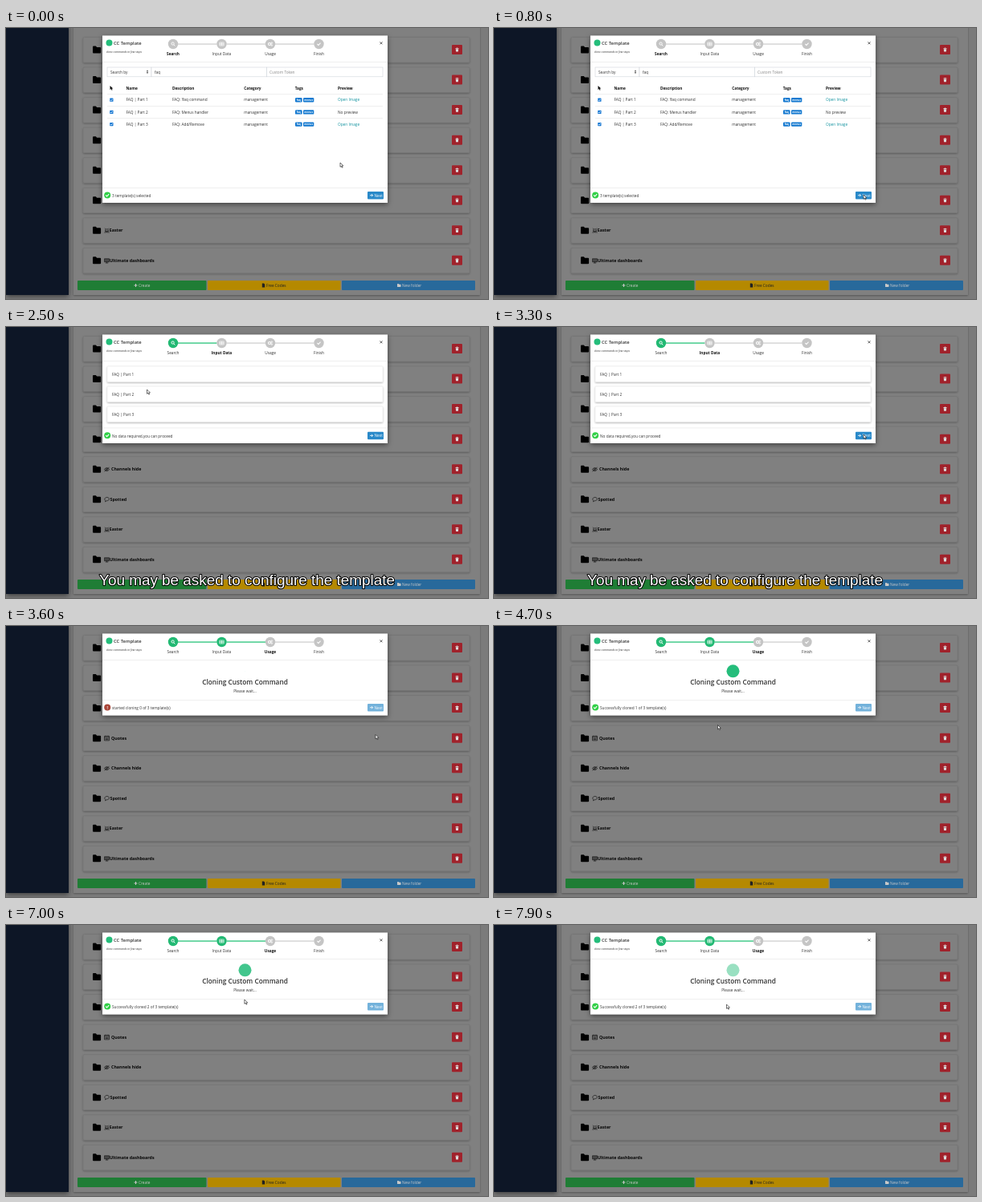
Animation of 600x338 px, one loop 8 s. Source, as an HTML page:

```html
<!DOCTYPE html>
<html lang="en">
<head>
<meta charset="utf-8">
<style>
  html, body { margin: 0; width: 100%; height: 100%; overflow: hidden; background: #808080; }
  svg { display: block; width: 600px; height: 338px; }
  text { font-family: "Open Sans", "Noto Sans", sans-serif; font-size: 4.75px; fill: #333; }
  .b { font-weight: 700; fill: #111; }
  .mid { text-anchor: middle; }
  #caption { font: 18.9px "Liberation Sans", Arial, sans-serif; fill: #fff; stroke: #000;
    stroke-width: 2px; paint-order: stroke; stroke-linejoin: round; }
</style>
</head>
<body>
<svg id="stage" viewBox="0 0 600 338">
  <defs>
    <linearGradient id="navy" x2="0" y2="1">
      <stop stop-color="#0b1525"/><stop offset="1" stop-color="#081326"/>
    </linearGradient>
    <filter id="soft" x="-10%" y="-30%" width="120%" height="180%">
      <feDropShadow dx="0" dy="1" stdDeviation="1" flood-opacity=".3"/>
    </filter>
    <filter id="deep" x="-10%" y="-20%" width="120%" height="150%">
      <feDropShadow dx="0" dy="2" stdDeviation="3" flood-opacity=".5"/>
    </filter>
    <path id="folder" d="M0 1q0-1 1-1h2.8l1.3 1.5h4q1 0 1 1v5.5q0 1-1 1H1q-1 0-1-1z"/>
    <path id="trash" d="M-2-2h1.2l.4-.6h.8l.4.6H2v.8h-4zM-1.7-.8h3.4L1.4 2.6h-2.8z" fill="#ddd"/>
    <path id="check" d="M-2 0L-.6 1.5 2-1.4" fill="none" stroke="#fff" stroke-width="1.1"/>
    <path id="arrow" d="M0 0v5.3l1.3-1.1.9 2 .9-.4-.9-1.9h1.7z" fill="#fff" stroke="#111" stroke-width=".6"/>
  </defs>
  <g id="page"></g>
  <g id="dialog"></g>
  <text id="caption" class="mid" x="300" y="322">You may be asked to configure the template</text>
  <use id="cursor" href="#arrow"/>
</svg>
<script>
const $ = id => document.getElementById(id);
const rect = (x, y, w, h, fill, more = '') =>
  `<rect x="${x}" y="${y}" width="${w}" height="${h}" fill="${fill}" ${more}/>`;
const text = (x, y, s, more = '') => `<text x="${x}" y="${y}" ${more}>${s}</text>`;
const circle = (x, y, r, fill, more = '') => `<circle cx="${x}" cy="${y}" r="${r}" fill="${fill}" ${more}/>`;
const path = (d, x, y, more = 'fill="#fff"') => `<path d="${d}" transform="translate(${x} ${y})" ${more}/>`;
const use = (id, x, y, more = '') => `<use href="#${id}" x="${x}" y="${y}" ${more}/>`;
const hline = (y, x = 120, w = 355) => rect(x, y, w, .5, '#dedede');

const line = 'fill="none" stroke="#151515" stroke-width=".7"';
const icons = {
  note: 'M-3-2.7h6v5.5h-6zM-3-1.2h6M-2 .2h4M-2 1.5h4M-1.5-3.3v1M1.5-3.3v1',
  eye: 'M-3.2 0Q0-4 3.2 0Q0 4-3.2 0M-1.2 0a1.2 1.2 0 1 0 2.4 0a1.2 1.2 0 1 0-2.4 0M-3 2.5L3-2.5',
  bubble: 'M-2 2.7l.3-1.3C-4-.7-2-2.7.3-2.7C4-2.7 3.6 1.8-.2 1.6z',
  bear: 'M-2.4-3l1.3 1.3h2.2L2.4-3M-1.8-1.5v2h3.6v-2M-1.8.5L-2.7 3M1.8.5L2.7 3M-1.5 2.6L1.5.7M-1.5.7l3 1.9',
  screen: 'M-3-2.5h6v4h-6zM0 1.5v1.2M-1.7 2.8h3.4M-2.5-1.5h5M-2.5-.3h5M-2.5.8h5'
};

function drawPage() {
  const rows = [, , , ['note', 'Quotes', 131], ['eye', 'Channels hide', 131],
    ['bubble', 'Spotted', 129.5], ['bear', 'Easter', 128.8], ['screen', 'Ultimate dashboards', 129]];
  let s = rect(0, 0, 600, 338, '#7b7b7b') + rect(84, -5, 506, 338, '#808080', 'filter="url(#soft)"')
    + rect(0, -5, 78, 338, 'url(#navy)', 'filter="url(#deep)"');
  for (let i = 0; i < 8; i++) {
    const y = 27 + i * 37.55;
    s += rect(96, y - 15.5, 481, 31.5, '#808080', 'rx="1.5" stroke="#707070" stroke-width=".5" filter="url(#soft)"')
      + use('folder', 108, y - 4.5) + rect(555, y - 6, 13, 12, '#a0222b', 'rx="1"') + use('trash', 561.5, y);
    if (rows[i]) {
      const [icon, name, x] = rows[i];
      s += path(icons[icon], 125.5, y + .4, line) + text(x, y + 2, name, 'class="b" style="font-size:5.3px;fill:#050505"');
    }
  }
  const dim = 'style="fill:#c8c8c8"';
  return s + rect(89, 315, 160.5, 12, '#1f7d35', 'rx="1"') + rect(251, 315, 165.5, 12, '#b58900', 'rx="1"')
    + rect(418, 315, 166, 12, '#28699b', 'rx="1"')
    + path('M-2 0h4M0-2v4', 161.5, 321, 'stroke="#c8c8c8" stroke-width="1"') + text(165, 322.7, 'Create', dim)
    + path('M-1.7-2.5h2.2l1.2 1.2v3.8h-3.4z', 320.5, 321, 'fill="#222"') + text(324, 322.7, 'Free Codes', 'style="fill:#222"')
    + use('folder', 487, 319, 'transform="translate(487 319) scale(.45) translate(-487 -319)" fill="#c8c8c8"')
    + text(493, 322.7, 'New folder', dim);
}

const stepX = [208, 268.5, 329, 389.5];
function stepIcon(i, x) {
  if (i == 0) return path('M-2-.5a1.6 1.6 0 1 0 3.2 0a1.6 1.6 0 1 0-3.2 0M.8.8L2.4 2.4', x, 20, 'fill="none" stroke="#fff"');
  if (i == 1) return path('M-2.7-2h5.4v4h-5.4zM-2.7-.6h5.4M-2.7.7h5.4M0-2v4', x, 20, 'fill="none" stroke="#fff" stroke-width=".6"');
  if (i == 2) return circle(x - 1, 20, 1.5, 'none', 'stroke="#fff" stroke-width="1.1"')
    + circle(x + 1.8, 18.6, .8, 'none', 'stroke="#fff" stroke-width=".8"')
    + circle(x + 1.8, 21.5, .8, 'none', 'stroke="#fff" stroke-width=".8"');
  return use('check', x, 20);
}

function frame(step, height) {
  let s = rect(120, 9.5, 355, height, '#fff', 'filter="url(#deep)"')
    + circle(128.5, 18.5, 4, '#25bd7b') + text(134, 20.5, 'CC Template', 'style="font-size:5.8px;font-weight:600"')
    + text(124.7, 31.2, 'clone commands in few steps', 'style="font-size:3.45px;font-style:italic"')
    + path('M-1.5-1.5l3 3M1.5-1.5l-3 3', 467, 18.8, 'stroke="#333" stroke-width=".8"') + hline(42);
  stepX.forEach((x, i) => {
    if (i < 3) s += rect(x + 6, 19.4, 48.5, 1.3, i < step ? '#29c47a' : '#cfcfcf');
    s += circle(x, 20, 6.2, i < step ? '#22b973' : '#c5c5c5') + stepIcon(i, x)
      + text(x, 34, ['Search', 'Input Data', 'Usage', 'Finish'][i], `class="mid${i == step ? ' b' : ''}"`);
  });
  return s;
}

function footer(y, message, ok = true, enabled = true) {
  return hline(y - 10) + circle(126.2, y - .5, 4, ok ? '#32d048' : '#aa4639')
    + (ok ? use('check', 126.2, y - .5) : text(126.2, y + 1.5, '!', 'class="mid" style="font-weight:700;fill:#fff"'))
    + text(132, y + 2, message)
    + `<g opacity="${enabled ? 1 : .65}">` + rect(450, y - 5, 20, 9.5, '#2989c9', 'rx="1"')
    + path('M-2 0h3.4M0-1.6L1.6 0L0 1.6', 455, y - .3, 'fill="none" stroke="#fff" stroke-width=".8"')
    + text(458.5, y + 1.5, 'Next', 'style="fill:#fff"') + '</g>';
}

function searchStep() {
  const grey = 'style="fill:#888"';
  const box = (x, w) => rect(x, 49, w, 11.8, '#fff', 'stroke="#cfd4da" stroke-width=".6"');
  let s = frame(0, 208.5) + box(126, 55) + box(181, 143.5) + box(324.5, 144.5)
    + text(130, 56.7, 'Search by') + path('M-1.2-.5L0-2.2 1.2-.5zM-1.2.5L0 2.2 1.2.5z', 176, 54.8, 'fill="#333"')
    + text(185, 56.7, 'faq') + text(328, 56.7, 'Custom Token', grey)
    + path('M-1.5-2.8v5l1.3-1 .8 1.7.9-.4-.8-1.7h1.6z', 131, 74.8, 'fill="#111"');
  [[149.5, 'Name'], [207, 'Description'], [296.3, 'Category'], [359.7, 'Tags'], [413, 'Preview']]
    .forEach(([x, name]) => s += text(x, 76.7, name, 'class="b"'));
  ['FAQ: !faq command', 'FAQ: Menus handler', 'FAQ: Add/Remove'].forEach((about, i) => {
    const y = 89.7 + i * 15.2, tag = 'class="mid" style="font-size:3.2px;font-weight:700;fill:#fff"';
    s += hline(y - 7.7, 126, 343) + rect(129.2, y - 2.2, 4.3, 4.3, '#1677d2', 'rx=".6"')
      + use('check', 131.3, y, `transform="translate(131.3 ${y}) scale(.7) translate(-131.3 ${-y})"`)
      + text(149.5, y + 1.7, 'FAQ | Part ' + (i + 1)) + text(207, y + 1.7, about) + text(296.3, y + 1.7, 'management')
      + rect(360, y - 2.7, 8.6, 5.4, '#1479d0', 'rx="1.2"') + text(364.3, y + .9, 'faq', tag)
      + rect(370, y - 2.7, 13.3, 5.4, '#1479d0', 'rx="1.2"') + text(376.6, y + .9, 'menus', tag)
      + (i == 1 ? text(413, y + 1.7, 'No preview') : text(413, y + 1.7, 'Open Image', 'style="fill:#1594a0"'));
  });
  return s + footer(209, '3 template(s) selected');
}

function inputStep() {
  let s = frame(1, 135.5);
  for (let i = 0; i < 3; i++) {
    const y = 49 + i * 25;
    s += rect(126, y, 343, 19.5, '#fff', 'rx="1" stroke="#e2e2e2" stroke-width=".5" filter="url(#soft)"')
      + text(132, y + 11.5, 'FAQ | Part ' + (i + 1));
  }
  return s + footer(135.7, 'No data required,you can proceed');
}

function cloneStep(done) {
  return frame(2, 102) + circle(0, 0, 8, '#25bd7b', 'id="pulse"')
    + text(297.5, 73.2, 'Cloning Custom Command', 'class="mid" style="font-size:8.3px;font-weight:600"')
    + text(297.5, 83.3, 'Please wait...', 'class="mid"')
    + footer(102, `${done ? 'Successfully' : 'started'} ${done ? 'cloned' : 'cloning'} ${done} of 3 template(s)`, done > 0, false);
}

const scenes = [[0, searchStep], [1000, inputStep], [3500, () => cloneStep(0)],
  [4300, () => cloneStep(1)], [6700, () => cloneStep(2)]];

// time, x, y of the pointer tip
const pointer = [[0, 416, 168], [500, 460, 207], [800, 460, 208], [1000, 454, 210.5], [1100, 454, 210.5],
  [2200, 175.5, 78], [2500, 175.5, 78], [3300, 460, 134], [3600, 460, 135.5], [3800, 460, 135.5],
  [4700, 278.5, 123.5], [6000, 305.5, 86], [7900, 289.5, 99], [8000, 289.5, 99]];

function pointerAt(t) {
  const i = pointer.findIndex(p => p[0] > t);
  const [t0, x0, y0] = pointer[i - 1], [t1, x1, y1] = pointer[i];
  const u = (t - t0) / (t1 - t0), e = u * u * (3 - 2 * u);
  return [x0 + (x1 - x0) * e, y0 + (y1 - y0) * e];
}

$('page').innerHTML = drawPage();
let shown = -1;
function render(now) {
  const t = Math.floor(now % 8000 / 100) * 100;
  const scene = scenes.filter(s => s[0] <= t).length - 1;
  if (scene != shown) {
    shown = scene;
    $('dialog').innerHTML = scenes[scene][1]();
  }
  $('caption').style.display = t >= 1000 && t < 3500 ? '' : 'none';
  if ($('pulse')) {
    // grows while fading in, then fades out at full size
    const phase = (t - 3575 + 750) / 750 % 1;
    $('pulse').setAttribute('transform', `translate(297.5 56.3) scale(${Math.min(1, phase * 2)})`);
    $('pulse').setAttribute('opacity', 1 - Math.abs(phase * 2 - 1));
  }
  $('cursor').setAttribute('transform', `translate(${pointerAt(t)})`);
}

const start = performance.now();
function tick() {
  render(performance.now() - start);
  requestAnimationFrame(tick);
}
tick();
</script>
</body>
</html>
```
